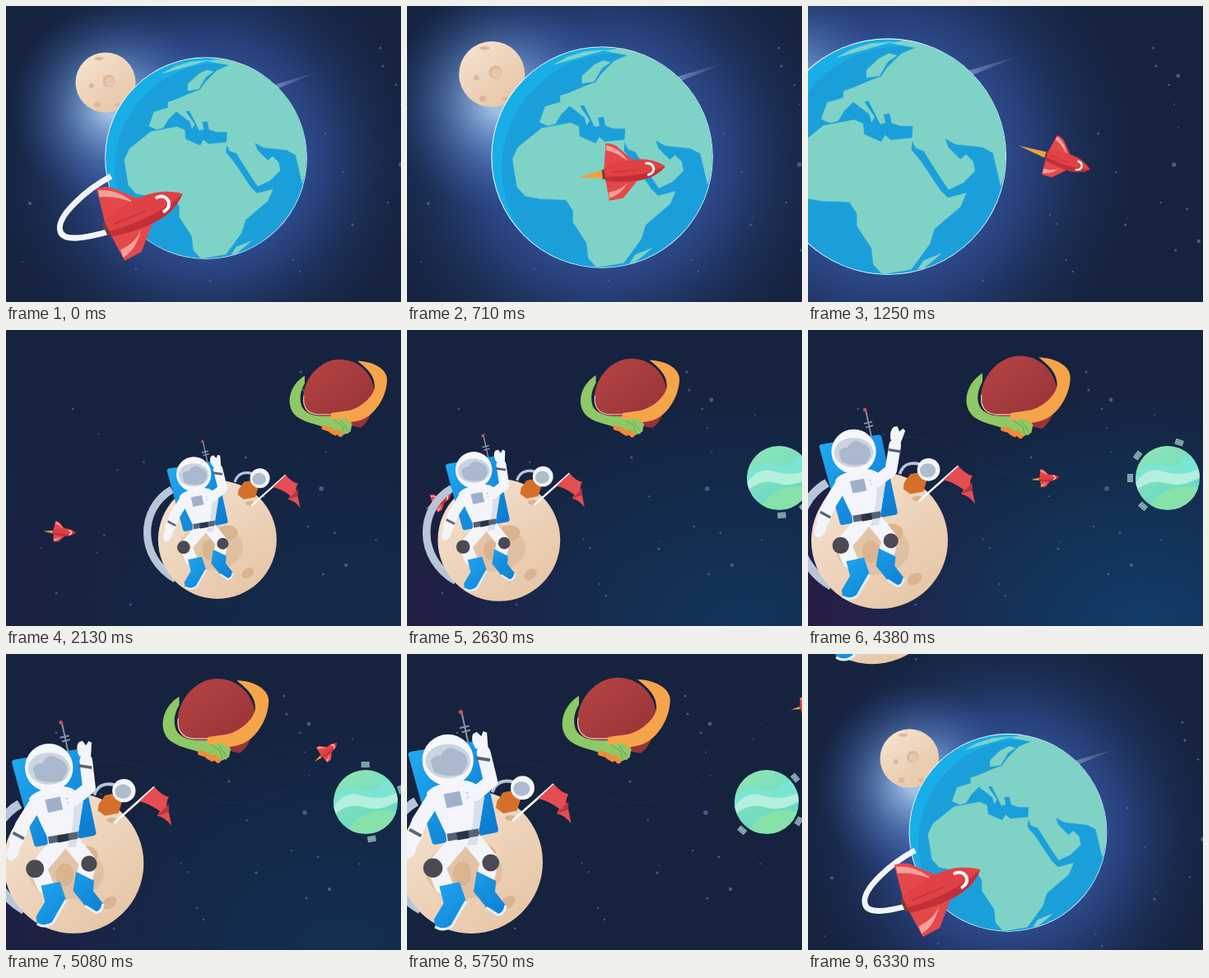
An HTML page that plays this animation: 480 by 360 pixels, repeating every 6370 ms.

```html
<!DOCTYPE html>
<html lang="en">
<head>
<meta charset="utf-8">
<title>Space tour</title>
<style>
html, body { margin: 0; height: 100%; overflow: hidden; background: #15233f; }
svg { display: block; width: 100vw; height: 100vh; }
.limb { fill: none; stroke: #f3f5fa; stroke-linecap: round; stroke-linejoin: round; }
</style>
</head>
<body>
<svg viewBox="0 0 480 360">
<defs>
  <radialGradient id="halo">
    <stop offset=".3" stop-color="#3559a8"/><stop offset=".55" stop-color="#2a437f" stop-opacity=".85"/>
    <stop offset="1" stop-color="#15233f" stop-opacity="0"/>
  </radialGradient>
  <radialGradient id="shine">
    <stop offset=".1" stop-color="#b5d6f5" stop-opacity=".85"/><stop offset=".5" stop-color="#6f9bd8" stop-opacity=".45"/>
    <stop offset="1" stop-color="#3559a8" stop-opacity="0"/>
  </radialGradient>
  <radialGradient id="blue" cx=".85" cy="1" r=".8">
    <stop offset="0" stop-color="#113d69"/><stop offset="1" stop-color="#113d69" stop-opacity="0"/>
  </radialGradient>
  <radialGradient id="purple" cx=".05" cy=".95" r=".6">
    <stop offset="0" stop-color="#271d48"/><stop offset="1" stop-color="#271d48" stop-opacity="0"/>
  </radialGradient>
  <linearGradient id="peach" x2=".8" y2="1"><stop stop-color="#f6e5d4"/><stop offset="1" stop-color="#e6c5a5"/></linearGradient>
  <linearGradient id="streak"><stop stop-color="#a9bde0" stop-opacity=".6"/><stop offset="1" stop-color="#a9bde0" stop-opacity="0"/></linearGradient>
  <linearGradient id="rust" x2=".8" y2="1"><stop stop-color="#b74443"/><stop offset="1" stop-color="#963338"/></linearGradient>
  <linearGradient id="mint" x2=".6" y2="1"><stop stop-color="#93e6b0"/><stop offset="1" stop-color="#63d8cb"/></linearGradient>
  <linearGradient id="pack" x2="1" y2="1"><stop stop-color="#22aaf2"/><stop offset="1" stop-color="#0b78cf"/></linearGradient>
  <clipPath id="globe"><circle cx="243" cy="185" r="122"/></clipPath>
  <clipPath id="ball"><circle r="39"/></clipPath>
  <clipPath id="flown"><rect id="flownBox" width="0" height="360"/></clipPath>
  <g id="stars" fill="#475a90"></g>
</defs>

<rect width="480" height="360" fill="#15233f"/>
<g id="nebula"><rect width="480" height="360" fill="url(#purple)"/><rect width="480" height="360" fill="url(#blue)"/></g>
<g id="glow"><circle r="275" fill="url(#halo)"/><circle cx="-112" cy="-62" r="125" fill="url(#shine)"/></g>
<use id="starsA" href="#stars"/>
<use id="starsB" href="#stars"/>

<g id="earth">
  <path d="M72-86L137-105 76-80Z" fill="url(#streak)"/>
  <g transform="translate(-122 -92)">
    <circle r="36.5" fill="url(#peach)"/>
    <g fill="#dcb899">
      <circle cx="4" cy="-2" r="7.5"/><circle cx="-17" cy="4" r="3"/>
      <ellipse cx="-8" cy="-29" rx="5.5" ry="2.2"/>
      <ellipse cx="-10" cy="27" rx="4" ry="3.4"/>
      <ellipse cx="15" cy="27" rx="4" ry="2"/>
    </g>
    <circle cx="5" cy="-1" r="5.5" fill="#e6c8ac"/>
  </g>
  <g transform="translate(-243 -185)">
    <circle cx="243" cy="185" r="122.8" fill="#e9f6fa"/>
    <g clip-path="url(#globe)">
      <circle cx="243" cy="185" r="122" fill="#18aee8"/>
      <circle cx="259" cy="197" r="127" fill="#1b9fdb"/>
      <g id="land" fill="#7fd3c6" stroke="#7fd3c6" stroke-width=".6" stroke-linejoin="round">
        <path d="M190 82L205 74 224 68 246 66 222 73Z"/>
        <path d="M246 67L272 72 262 76 256 79 242 93 236 102 225 106 206 114 197 117 197 124 180 129 174 146 183 150
          191 148 197 138 207 128 224 141 226 149 229 144 218 128 223 127 235 151 240 150 238 141 245 140 300 120 290 60Z"/>
        <path d="M221 103L221 95 234 83 244 78 252 80 243 86 234 101Z"/>
        <path d="M245 140L247 150 256 153 269 153 268 168 272 176 280 179 299 209 306 219 321 212 333 200 331 190 324 183
          318 188 305 175 302 166 313 172 341 175 352 181 360 215 370 180 350 95 290 60 280 80Z"/>
        <path d="M274 302L280 293 298 286 280 301Z"/>
        <path d="M268 166L246 168 240 163 236 170 218 162 217 151 208 147 176 153 150 174 144 187 149 218 158 228 175 231
          203 232 211 244 211 257 226 280 228 297 237 307 267 302 286 276 291 260 318 237 324 223 305 228 297 220 277 190 267 178Z"/>
      </g>
    </g>
  </g>
  <path id="ring" pathLength="100" fill="none" stroke="#f2f4f8" stroke-width="7"
    d="M-115 22C-143 37-183 70-177 89C-173 103-143 96-121 90C-80 78-20 45 20 20"/>
</g>

<path clip-path="url(#flown)" id="track" fill="none" stroke="#53638a" stroke-width=".8" stroke-dasharray="1 2.5" opacity=".55"
  d="M98 134C130 125 165 133 200 155S265 184 300 179S365 150 390 120S440 75 492 62"/>

<g id="rocket">
  <path id="flame" d="M0-7L-64-1 0 7Z" fill="#f0a040"/>
  <rect x="-53" y="-8" width="8" height="16" fill="#70402f"/>
  <path d="M-49-8L-41-50Q-26-48-20-39L2-15ZM-49 8L-47 44-24 43 2 18Z" fill="#e5484b"/>
  <path d="M-40-47Q-17-38-7-14Q-21-31-42-39ZM-47 40Q-28 38-13 18Q-25 30-46 30Z" fill="#f4a09a"/>
  <path d="M-49-11Q0-24 29-13Q44-7 51 0Q42 9 27 14Q0 22-49 11Z" fill="#df4145"/>
  <path d="M-49 4Q10 13 51 0Q42 9 27 14Q0 22-49 11Z" fill="#c22f38"/>
  <path d="M-40-2L2 0" stroke="#ba3038" stroke-width="1.2"/>
  <path d="M21-9Q31-9 32 1Q31 9 22 10" fill="none" stroke="#fff" stroke-width="4" stroke-linecap="round"/>
</g>

<g id="moon">
  <path d="M-60-66C-104-40-104 24-55 52" fill="none" stroke="#b9c6d8" stroke-width="10"/>
  <circle r="78" fill="url(#peach)"/>
  <ellipse cx="-8" cy="10" rx="42" ry="30" fill="#c59b78" opacity=".3"/>
  <g fill="#d9b491">
    <ellipse cx="40" cy="44" rx="9" ry="6" transform="rotate(-35 40 44)"/><ellipse cx="14" cy="-9" rx="13" ry="10"/>
    <ellipse cx="-10" cy="13" rx="10" ry="13"/><ellipse cx="43" cy="-48" rx="6" ry="3"/>
  </g>
  <path d="M23-76C27-90 41-91 53-84" fill="none" stroke="#b8c5d7" stroke-width="3.5"/>
  <path d="M28-66L35-76 46-78 54-69 50-56 35-53 27-59Z" fill="#d5702a"/>
  <circle cx="56" cy="-81" r="13" fill="#f3f5fa"/>
  <ellipse cx="55" cy="-80" rx="9" ry="8" fill="#aebccd"/>
  <path d="M45-45L90-85" stroke="#fff" stroke-width="2.4"/>
  <path d="M90-85Q99-75 106-74Q101-66 106-57L109-42Q101-52 93-53L96-58Q84-67 73-69Z" fill="#e64d52"/>
  <path d="M93-53L106-66 106-57Z" fill="#b93540"/>
</g>

<g id="astro">
  <path d="M-45-75L16-85 33-5-23 6Z" fill="url(#pack)" stroke="url(#pack)" stroke-width="6" stroke-linejoin="round"/>
  <path d="M2-114L8-86M0-100L9-102M2-96L10-98" stroke="#8594aa" stroke-width="1.6"/>
  <circle cx="1" cy="-115" r="2" fill="#e0484c"/>
  <path class="limb" d="M-23-36L-38-12-44 4" stroke-width="14"/>
  <path d="M-47-5L-36 1" stroke="#5b6579" stroke-width="3"/>
  <ellipse cx="-47" cy="14" rx="6" ry="9" transform="rotate(25 -47 14)" fill="#f3f5fa"/>
  <path class="limb" d="M-3 8L-22 30-15 47M12 5L28 25 24 40" stroke-width="17"/>
  <g fill="#4b4a52"><circle cx="-25" cy="31" r="9"/><circle cx="29" cy="26" r="8"/></g>
  <path d="M-19 48L0 44 6 62-7 85Q-15 91-23 86L-24 79-15 64ZM16 34L34 43 33 53 43 66Q42 74 36 75L25 68 13 53Z" fill="url(#pack)"/>
  <path d="M6 62L-7 85Q-15 91-23 86M43 66Q42 74 36 75L25 68" fill="none" stroke="#e6eefa" stroke-width="2.5"/>
  <path d="M-31-39Q-25-49 4-51Q18-50 23-36L18-4 16 9-11 13-13-1Z" fill="#f3f5fa"/>
  <path d="M12-47L23-36 16 9 7 10Q17-20 12-47" fill="#d9e0eb"/>
  <path d="M-12-1L18-6 18 1-11 6Z" fill="#596274"/><path d="M-3-2L8-4 9 3-2 5Z" fill="#293449"/>
  <path d="M-15-38L0-41 3-28-12-25Z" fill="#9fb1ca"/>
  <path d="M6-39L13-40M7-35L14-36" stroke="#a8b5c8" stroke-width="1.2"/>
  <path id="arm" class="limb" stroke-width="13"/>
  <path id="cuff" stroke="#596274" stroke-width="3"/>
  <path id="hand" d="M-6 5Q-9-4-5-9L-1-10 2-5 5-9 8-7 5 9Z" fill="#f3f5fa"/>
  <circle cx="-11" cy="-70" r="24" fill="#f6f7fb"/>
  <ellipse cx="-11" cy="-69" rx="21" ry="16" fill="#cbd5e2"/>
  <path d="M-27-69Q-26-74-18-74Q-11-86-2-79Q8-76 7-66L2-57Q-13-53-24-59Z" fill="#aab9cc"/>
</g>

<g id="red">
  <path d="M-46 5C-47-24-24-49 1-49C27-49 46-28 46-3C46 13 39 31 28 39Q10 37-4 25Q-24 25-39 20Q-45 14-46 5" fill="url(#rust)"/>
  <path d="M-45-2C-47 11-42 20-28 22L-6 22" fill="none" stroke="#efc9b7" stroke-width="1.2"/>
  <path d="M-44-28C-65-15-70 12-54 25C-40 35-24 34-13 42L4 49 15 44 17 34 6 23-10 24C-29 25-43 22-48 11C-52-1-48-11-44-18Z" fill="#8fc866"/>
  <path d="M24-47C43-47 63-37 62-22C61 2 44 26 25 30L10 33-11 28-10 20 12 17C27 14 44 0 46-13C47-29 34-39 24-47Z" fill="#f6a44a"/>
  <path d="M-19 39L-12 41M-10 43L-5 46M-2 44L2 48" stroke="#f08b38" stroke-width="6" stroke-linecap="round" fill="none"/>
  <path d="M-7 29L7 27 16 34 12 47 5 45-2 36Z" fill="#8fc866"/>
  <path d="M-7 29L4 36 7 46M3 30L12 43" stroke="#6da64e" fill="none"/>
</g>

<g id="green">
  <g id="sats"></g>
  <circle r="39" fill="url(#mint)"/>
  <g clip-path="url(#ball)">
    <path d="M-40-2Q-25-22-8-16Q12-10 20-24L42-32V0Q20 8 0 1Q-20-7-40 12Z" fill="#7be5d3"/>
    <path d="M-40 7Q-24-15-6-8Q18 0 40-12V-2Q18 13-3 6Q-23 0-40 17Z" fill="#b4f0dc"/>
    <path d="M-24 37Q-2 3 40 12V40Z" fill="#86e2a9"/>
  </g>
</g>
</svg>

<script>
const LOOP = 6370, SLIDE = 6020, PAN = 721;
const $ = id => document.getElementById(id);
const clamp = v => Math.max(0, Math.min(1, v));
const ramp = (t, a, b) => clamp((t - a) / (b - a));
const set = (id, name, v) => $(id).setAttribute(name, v);
const put = (id, x, y, s = 1, r = 0) =>
  set(id, 'transform', `translate(${x} ${y}) rotate(${r}) scale(${s})`);

// Smooth curve through rows of [time, ...values]
function at(keys, t) {
  let i = 1;
  while (i < keys.length - 1 && keys[i][0] < t) i++;
  const a = keys[i - 1], b = keys[i], p = keys[i - 2] || a, n = keys[i + 1] || b;
  const d = b[0] - a[0], u = clamp((t - a[0]) / d), w = u * u * (3 - 2 * u);
  return a.slice(1).map((v, k) => {
    const j = k + 1;
    const m = (b[j] - p[j]) / (b[0] - p[0]) * d, q = (n[j] - v) / (n[0] - a[0]) * d;
    return v + (b[j] - v) * w + m * u * (1 - u) ** 2 - q * u * u * (1 - u);
  });
}

// time, x, y, angle
const rocketKeys = [
  [-350, 138, 257, -25], [0, 168, 250, -25], [600, 262, 205, -12], [1250, 316, 190, 18],
  [1700, 190, 222, 15], [2130, 71, 246, 2], [2700, 45, 200, -30], [3380, 128, 130, 6],
  [3800, 190, 150, 24], [4380, 293, 180, -6], [4800, 352, 160, -36],
  [5200, 410, 100, -38], [5750, 490, 63, -12], [6000, 530, 55, -12]];
const rocketSize = [[0, 1], [1250, .55], [2130, .27], [6000, .25]];
// time, x, y, size
const moonKeys = [[2130, 95.5, 255, .923], [3380, 97, 256, 1], [4380, 87, 256, 1.064], [5750, 78, 253, 1.115]];
const astroKeys = [[2130, 76.5, 237, .88], [3380, 75, 232, 1], [4380, 68, 227, 1.13], [5750, 64, 220, 1.3]];
const redKeys = [[2130, 258.5, 82, .944], [5750, 255, 80, 1.045]];
// angle, first and last moment in view
const sats = [[217, 0, LOOP], [180, 0, 5000], [131, 0, 5000], [288, 4000, LOOP], [28, 5000, LOOP]];

// Bright stars are placed, faint ones scattered
const stars = [
  [455, 51, 1.5], [474, 96, 1.3], [388, 155, 1.5], [480, 193, 2.8], [464, 239, 1.2], [29, 240, 2],
  [485, 85, 2.4], [421, 266, 1.6], [510, 286, 2.2], [458, 73, 1.6], [496, 247, 1.4], [482, 297, 1.5],
  [158, 320, 1.3], [248, 334, 1.3], [178, 96, 1.3], [357, 323, 1.2]];
let seed = 7;
const random = () => (seed = seed * 16807 % 2147483647) / 2147483647;
for (let i = 0; i < 18; i++) stars.push([20 + 570 * random(), 90 + 240 * random(), .8 + .4 * random()]);
$('stars').innerHTML = stars.map(([x, y, r]) => `<circle cx="${x}" cy="${y}" r="${r}"/>`).join('');

function draw(t) {
  const sliding = t > SLIDE;
  const left = sliding ? ((LOOP - t) / (LOOP - SLIDE)) ** 1.1 : 0;
  const down = 360 * left, up = sliding ? down - 360 : 0;
  const ta = sliding ? t - LOOP : t;
  const ease = v => .5 - .5 * Math.cos(Math.PI * ramp(v, 580, 2840));
  const pan = PAN * ease(ta), rest = PAN * (1 - ease(t));
  const zoom = 1 + ta * (ta < 0 ? .0005 : .000137);

  for (const id of ['glow', 'earth']) put(id, 243 - pan, 185 + down - ta * .0015, zoom);
  put('starsA', -117 * ease(ta) ** .75, down);
  put('starsB', -117, up);
  set('starsB', 'visibility', sliding ? 'visible' : 'hidden');
  set('nebula', 'opacity', ramp(t, 1800, 3000) * (1 - ramp(t, 4500, 5600)));

  const tail = 100 * ramp(ta, 0, 750), head = 53 + 47 * ramp(ta, 0, 600);
  set('ring', 'stroke-dasharray', `${Math.max(0, head - tail)} 300`);
  set('ring', 'stroke-dashoffset', -tail);
  set('ring', 'visibility', head > tail ? 'visible' : 'hidden');

  const [rx, ry, angle] = at(rocketKeys, ta);
  put('rocket', rx, ry + down, at(rocketSize, ta)[0], angle);
  set('flame', 'transform', `translate(-50 0) scale(${ramp(ta, 300, 900) * (1 - .3 * ramp(ta, 1250, 2130))} 1)`);
  set('flownBox', 'width', t > 3200 ? (sliding ? 500 : rx) : 0);
  put('track', 0, up);

  const [mx, my, ms] = at(moonKeys, t), [ax, ay, as] = at(astroKeys, t), [px, py, ps] = at(redKeys, t);
  put('moon', mx + rest, my + up, ms);
  put('astro', ax + rest, ay + up, as);
  put('red', px + rest * .905, py + up, ps);
  put('green', 437 + rest, 180 + up);

  const sway = 9.5 * Math.cos((t - 3900) / 3600 * 2 * Math.PI);
  const wrist = 29 + sway * .7;
  set('arm', 'd', `M14-38L29-50L${wrist}-77`);
  set('cuff', 'd', `M${wrist - 7}-72L${wrist + 6}-70`);
  put('hand', 29 + sway, -87, 1, sway * 1.6);

  $('sats').innerHTML = sats.filter(s => t >= s[1] && t < s[2]).map(([a]) =>
    `<g transform="rotate(${a + (t - 4380) * .075}) translate(45 0)"><rect x="-3" y="-5" width="7" height="10" fill="#8aaeb2"/>` +
    `<path d="M-1-4V4M2-4V4" stroke="#527e88" stroke-width=".8"/></g>`).join('');
}

const start = performance.now();
function tick() {
  draw((performance.now() - start) % LOOP);
  requestAnimationFrame(tick);
}
tick();
</script>
</body>
</html>
```
